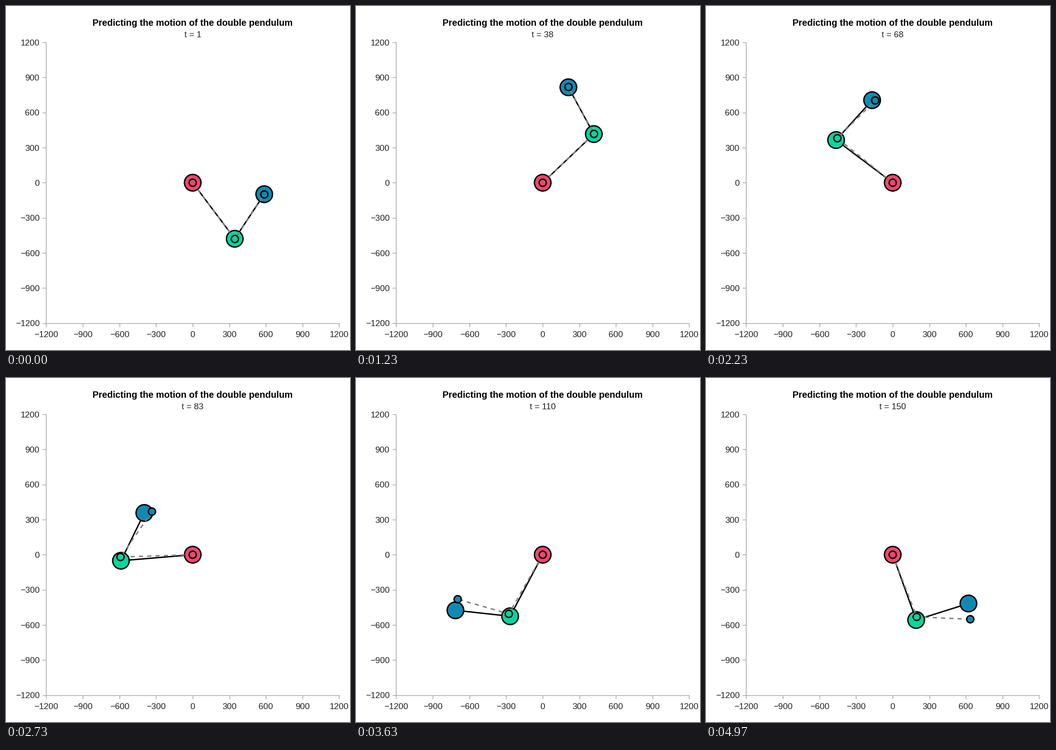
A matplotlib script that plays this animation: 748x748 px, repeating every 5 s.

```python
import numpy as np
import matplotlib.pyplot as plt
from matplotlib.animation import FuncAnimation
from matplotlib.patches import Circle

SIZE, DPI = 748, 100
PX = 72 / DPI  # points per pixel
STEPS, TICK_MS, LOOP_MS = 150, 20, 5000
LEFT, RIGHT, TOP, BOTTOM = 87.5, 724.5, 79, 689.5
ORIGIN = np.array([LEFT + RIGHT, TOP + BOTTOM]) / 2
SCALE = np.array([RIGHT - LEFT, TOP - BOTTOM]) / 2400
COLORS = ["#ef476f", "#06d6a0", "#118ab2"]
ARM1, ARM2 = 590, 451

# Key poses: step, arm angles in degrees (counter-clockwise from straight
# down), and how far the prediction's angles have drifted from them
POSES = [(0, 35.7, 147.6, 0, 0),
         (20, 85, 206.7, 0, 0),
         (37, 134.8, 207.5, 0, 0),
         (53, 187.4, 160, -0.5, 1.6),
         (82, 275, 154.9, -3.1, -8.5),
         (109, 333.1, 263.5, -1.9, -10.1),
         (131, 356.5, 377.9, 0.9, -23.4),
         (149, 379, 468.2, 1.3, -20.8)]


def spline(x, y, t):
    """Natural cubic spline through the rows of y at x, evaluated at t."""
    n, h = len(x), np.diff(x)
    slope = np.diff(y, axis=0) / h[:, None]
    a, b = np.eye(n), np.zeros_like(y)
    for i in range(1, n - 1):
        a[i, i - 1:i + 2] = h[i - 1], 2 * (h[i - 1] + h[i]), h[i]
        b[i] = 6 * (slope[i] - slope[i - 1])
    m = np.linalg.solve(a, b)
    k = np.clip(np.searchsorted(x, t, side="right") - 1, 0, n - 2)
    d, hk = (t - x[k])[:, None], h[k][:, None]
    lin = slope[k] - hk * (2 * m[k] + m[k + 1]) / 6
    return y[k] + d * (lin + d * (m[k] / 2 + d * (m[k + 1] - m[k]) / (6 * hk)))


def joints(th1, th2, len1, len2):
    """Pixel positions of pivot, elbow and tip at every step."""
    def arm(th, length):
        th = np.radians(th)
        return np.stack([length * np.sin(th), -length * np.cos(th)], axis=-1)
    elbow = arm(th1, len1)
    tip = elbow + arm(th2, len2)
    return np.stack([0 * elbow, elbow, tip], axis=1) * SCALE + ORIGIN


t = np.arange(STEPS)
poses = np.array(POSES, float)
theta1, theta2, drift1, drift2 = spline(poses[:, 0], poses[:, 1:], t).T

# The predicted arms do not keep their length: one shrinks, one wobbles
fade = np.clip((t - 80) / 50, 0, 1)
shrink = 25 * fade ** 2 * (3 - 2 * fade)
wobble = 15 * np.clip(t / 80, 0, 1) ** 3 * np.cos(2 * np.pi * (t - 82) / 48)

real = joints(theta1, theta2, ARM1, ARM2)
guess = joints(theta1 + drift1, theta2 + drift2, ARM1 + 2 - shrink, ARM2 + wobble)

fig = plt.figure(figsize=(SIZE / DPI, SIZE / DPI), dpi=DPI, facecolor="white")
ax = fig.add_axes([0, 0, 1, 1])
ax.set(xlim=(0, SIZE), ylim=(SIZE, 0))
ax.axis("off")


def text(x, y, s, size, ha="center", color="#222222", **kw):
    return ax.text(x, y, s, fontsize=size * PX, ha=ha, va="baseline",
                   family="Liberation Sans", color=color, **kw)


def axis_line(xs, ys):
    ax.plot(xs, ys, color="#999999", lw=1.3 * PX, solid_capstyle="butt")


axis_line([LEFT, LEFT], [TOP - 0.5, BOTTOM + 0.5])
axis_line([LEFT - 0.5, RIGHT + 0.5], [BOTTOM, BOTTOM])
for value in range(-1200, 1201, 300):
    x, y = value * SCALE + ORIGIN
    label = str(value).replace("-", "\u2212")
    axis_line([LEFT - 8, LEFT], [y, y])
    axis_line([x, x], [BOTTOM, BOTTOM + 8])
    text(73, y + 6.8, label, 18.6, ha="right")
    text(x, 720.3, label, 18.6)

text(406, 43, "Predicting the motion of the double pendulum", 19.85,
     color="black", weight="bold")
clock = text(406, 67.5, "", 18.8)


def linkage(radius, z, **style):
    line, = ax.plot([], [], lw=3 * PX, zorder=z, **style)
    bobs = [ax.add_patch(Circle(ORIGIN, radius, fc=c, ec="black", lw=3 * PX,
                                zorder=z + 1)) for c in COLORS]
    return line, bobs


solid = linkage(18, 3, color="black")
dashed = linkage(7.8, 5, color="gray", ls=(0, (3, 3)), dash_capstyle="butt")


def draw(tick):
    # 30 steps per second on a finer clock, each step rounded to 10 ms
    step = int((tick * TICK_MS + 15) * STEPS / LOOP_MS)
    for (line, bobs), path in ((solid, real[step]), (dashed, guess[step])):
        line.set_data(*path.T)
        for bob, center in zip(bobs, path):
            bob.center = center
    clock.set_text(f"t = {step + 1}")
    return []


anim = FuncAnimation(fig, draw, frames=LOOP_MS // TICK_MS, interval=TICK_MS,
                     repeat=True)
plt.show()
```
